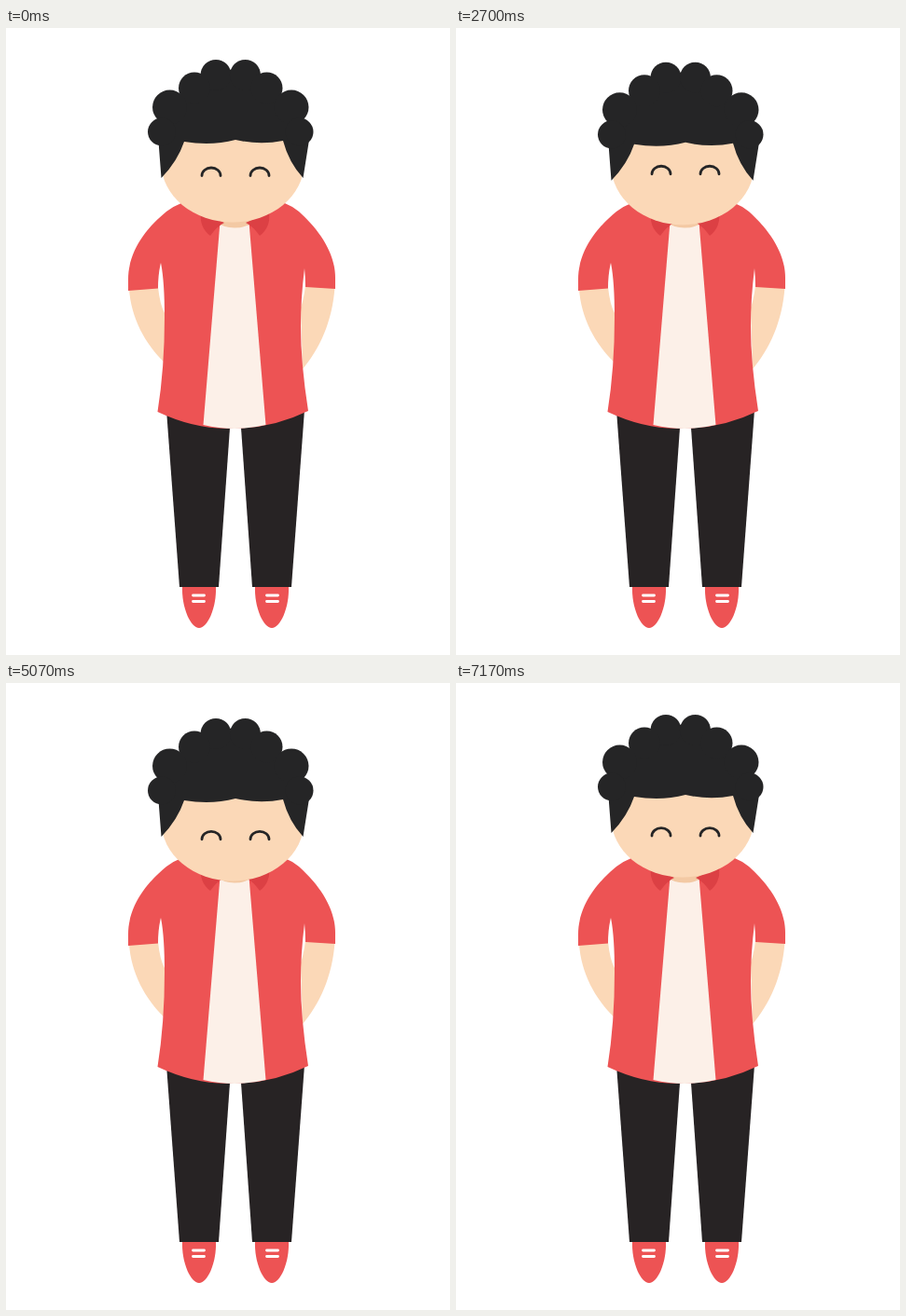
Recreate the animation shown at these times as an HTML page. Size 476 by 673 pixels, loop 7.26 s.

```html
<!DOCTYPE html>
<html lang="en">
<head>
<meta charset="utf-8">
<title>Nodding boy</title>
<style>
  html, body { margin: 0; width: 100%; height: 100%; overflow: hidden; background: #fff; }
  svg { display: block; width: 476px; height: 673px; }
  .skin { fill: #fbd8b7; }
  .red { fill: #ed5354; }
  .hair { fill: #252526; }
  .line { fill: none; stroke-linecap: round; stroke-width: 2.8; }
</style>
</head>
<body>
<svg viewBox="0 0 476 673">
  <!-- legs: one side, then its mirror image -->
  <g id="leg">
    <path class="red" d="M189 599C188 622 198 644 207 644C216 644 226 622 225 599Z"/>
    <path class="line" stroke="#fff" d="M200.500 609h12M200.500 615.500h12"/>
    <path fill="#272324" d="M172 410L186 600H228L240.500 422Z"/>
  </g>
  <use href="#leg" transform="matrix(-1 0 0 1 492 0)"/>

  <!-- arms -->
  <path class="skin" d="M132 280C134 311 149 339 170 359V306Q165 297 163 278Z"/>
  <path class="skin" d="M352.500 278C350 315 336 345 318 366L316 300Q319 292 321 277Z"/>

  <!-- jacket and shirt -->
  <path class="red" d="M205 184Q186 186 172 197C150 215 131 240 131 270V282L163 279.500
    Q163 264 166 252Q170 272 170 310Q170 365 162.500 412Q205 432 245 429.500Q285 430 324 411
    Q316 360 316 320Q316 290 320 258Q321 268 321 278L353 280V268C353 240 334 215 314 197
    Q301 186 282 184Z"/>
  <path fill="#fcf0e8" d="M229.500 208H260.500L278.500 426Q245 434 211.500 426Z"/>
  <path fill="#f3c9a4" d="M226 180H264V208Q258 214.500 245 214.500Q233 214.500 226 208Z"/>
  <path id="collar" fill="#dc4044" d="M209 198Q207 214 219 223Q226 213 234 209Z"/>
  <use href="#collar" transform="matrix(-1 0 0 1 491 0)"/>

  <g id="head">
    <ellipse class="skin" cx="243" cy="145" rx="76.500" ry="63.500"/>
    <g id="eyes" class="line" stroke="#252526">
      <path id="eye" d="M210 158.500a10 8.500 0 0 1 20 0"/>
      <use href="#eye" x="52"/>
    </g>
    <g class="hair">
      <path d="M166.500 161L163.500 122L165 90L200 60L225 45H257L282 60L315 90L325 120L318.500 161
        Q303 144 297 121Q272 126 246 120Q220 127 191 122Q184 143 166.500 161Z"/>
      <g id="curls">
        <circle cx="225" cy="50.500" r="16.500"/>
        <circle cx="202" cy="64.500" r="17"/>
        <circle cx="175.500" cy="85" r="18.500"/>
        <circle cx="167" cy="111.500" r="15"/>
      </g>
      <use href="#curls" transform="matrix(-1 0 0 1 481.500 0)"/>
    </g>
  </g>
</svg>
<script>
const LOOP = 7260, FRAME = 100 / 3, SECOND_START = 110, NOD_END = 105;
const { sin, PI } = Math;
const head = document.getElementById("head");
const eyes = document.getElementById("eyes");

// two nods that start and end at rest, with a slow sway
function headY(frame) {
  const w = 2 * PI * frame / NOD_END;
  return -7 * sin(2 * w) - 2 * sin(w) - 1.6 * sin(w / 2);
}

// the eyes drift on the face at a slower rhythm
const eyesY = frame => -5.6 * sin(2 * PI * frame / 60);

const shift = (part, y) => part.setAttribute("transform", `translate(0 ${y})`);

function draw() {
  const step = Math.floor((performance.now() % LOOP + 4) / FRAME);
  const frame = Math.min(step % SECOND_START, NOD_END);
  shift(head, headY(frame));
  shift(eyes, eyesY(frame));
  requestAnimationFrame(draw);
}
draw();
</script>
</body>
</html>
```
